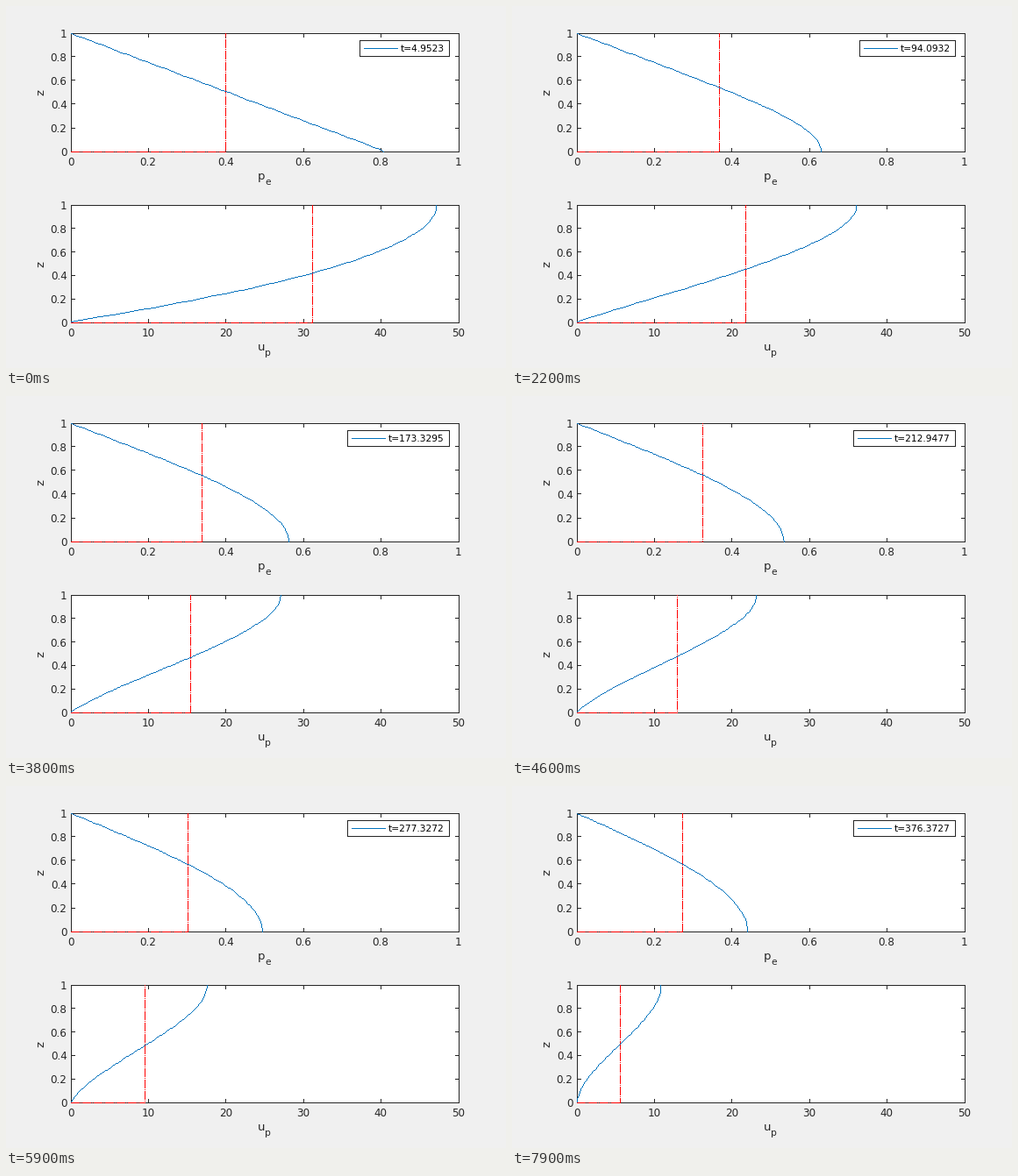
These frames come from a looping animation (570x413 px, 8000 ms). A matplotlib script:

```python
import math
import numpy as np
import matplotlib.pyplot as plt
from matplotlib.animation import FuncAnimation
from matplotlib.collections import PolyCollection
from matplotlib.patches import Rectangle

W, H, DPI = 570, 413, 100
PX = 72 / DPI                      # one pixel in points
X0, X1 = 74, 516
SPAN = X1 - X0
UPPER, LOWER = (31, 166), (227, 361)
DARK, BLUE, RED = "#262626", "#0072bd", "#ff0000"
DASH = (10, 2, 1, 2)
DT = 4.952272

plt.rcParams["font.family"] = "DejaVu Sans"
fig = plt.figure(figsize=(W / DPI, H / DPI), dpi=DPI, facecolor="#f0f0f0")
ax = fig.add_axes([0, 0, 1, 1])
ax.set_xlim(0, W)
ax.set_ylim(H, 0)
ax.axis("off")


def stroke(xs, ys, color, z=2, **kw):
    """Hard-edged one pixel line through pixel centres."""
    line, = ax.plot(np.add(xs, 0.5), np.add(ys, 0.5), color=color, lw=PX,
                    antialiased=False, snap=False, zorder=z, **kw)
    return line


def label(x, y, s, size, color=DARK, ha="center", va="baseline", **kw):
    return ax.text(x, y, s, fontsize=size * PX, color=color,
                   ha=ha, va=va, zorder=8, **kw)


def panel(box, xticks, name, sub):
    top, bottom = box
    ax.add_patch(Rectangle((X0, top), SPAN, bottom - top, fc="white", ec="none"))
    stroke([X0, X1, X1, X0, X0], [top, top, bottom, bottom, top], DARK,
           solid_joinstyle="miter", solid_capstyle="projecting")
    last = len(xticks) - 1
    for i, text in enumerate(xticks):
        x = X0 + SPAN * i / last
        label(x - 0.4, bottom + 16, text, 12)
        if 0 < i < last:
            stroke([int(x)] * 2, [bottom - 4, bottom], DARK)
            stroke([int(x)] * 2, [top, top + 4], DARK)
    for i, text in enumerate(("0", "0.2", "0.4", "0.6", "0.8", "1")):
        y = round(bottom - (bottom - top) * i / 5)
        label(69.5, y + 5, text, 12, ha="right")
        if 0 < i < 5:
            y = int(bottom + 0.1 - (bottom - top + 0.5) * i / 5)
            stroke([X0, X0 + 4], [y, y], DARK)
            stroke([X1 - 4, X1], [y, y], DARK)
    label(291, bottom + 32, name, 13.2)
    label(298.4, bottom + 38, sub, 10.6)
    label(40, (top + bottom) / 2 + 0.5, "z", 13.2, va="center", rotation=90)


panel(UPPER, ("0", "0.2", "0.4", "0.6", "0.8", "1"), "p", "e")
panel(LOWER, ("0", "10", "20", "30", "40", "50"), "u", "p")

# Key values over time, joined by smooth cubics
KNOTS = DT * np.array([1, 10, 28, 43, 56, 65, 76])
P_MEAN = np.array([250, 243, 228.3, 217.3, 207.3, 201.3, 194])
U_MEAN = np.array([349, 305, 233, 188, 158, 141, 123])
U_TOP = np.array([47.1, 41.6, 30.7, 23.1, 17.5, 14.2, 10.8])


def smooth(t, vals):
    i = int(np.clip(np.searchsorted(KNOTS, t) - 1, 0, len(KNOTS) - 2))
    m = np.gradient(vals, KNOTS)
    h = KNOTS[i + 1] - KNOTS[i]
    s = (t - KNOTS[i]) / h
    return ((1 + 2 * s) * (1 - s) ** 2 * vals[i] + s * (1 - s) ** 2 * h * m[i]
            + s * s * (3 - 2 * s) * vals[i + 1] + s * s * (s - 1) * h * m[i + 1])


erfc = np.vectorize(math.erfc)


def ierfc(x):
    return np.exp(-x * x) / math.sqrt(math.pi) - x * erfc(x)


Z = np.linspace(0, 1, 51)


def pressure(t):
    """Linear profile relaxing from a sealed bottom, drained top."""
    s = t - DT
    tau = 0.000444 * s + 0.0008 * (1 - math.exp(-s / 5)) + 0.00006
    d = 2 * math.sqrt(tau)
    return 0.813 * (1 - Z - d * (ierfc(Z / d) - ierfc((2 - Z) / d)))


def displacement(t):
    """Parabola turning into an S-curve as its mean falls."""
    top = smooth(t, U_TOP)
    mean = (smooth(t, U_MEAN) - X0) * 50 / SPAN
    w = 6.2 * (mean / top - 0.5)
    return top * (w * (2 * Z - Z * Z) + (1 - w) * (3 * Z**2 - 2 * Z**3))


SQUARE = np.array([(0, 0), (1, 0), (1, 1), (0, 1)])


class Curve:
    """Polyline drawn as a chain of single pixels."""

    def __init__(self, box, limit, start=0):
        top, bottom = box
        self.scale = SPAN / limit
        self.ys = bottom - (bottom - top) * (start + (1 - start) * Z)
        self.dots = PolyCollection([], facecolors=BLUE, edgecolors="none",
                                   antialiaseds=False, snap=False, zorder=4)
        ax.add_collection(self.dots, autolim=False)

    def move(self, vals):
        pts = np.rint(np.column_stack([X0 + self.scale * vals, self.ys]))
        chain = [pts[:1]]
        for a, b in zip(pts, pts[1:]):
            n = int(np.abs(b - a).max())
            if n:
                steps = np.arange(1, n + 1)[:, None] / n
                chain.append(np.rint(a + (b - a) * steps))
        cells = np.concatenate(chain)
        self.dots.set_verts(cells[:, None, :] + SQUARE)


class Mean:
    """Dash-dot path along the bottom axis, then up at the mean."""

    def __init__(self, box):
        self.top, self.bottom = box
        self.flat = stroke([], [], RED, 3, ls=(0, DASH))
        self.rise = stroke([], [], RED, 3)

    def move(self, x):
        c = int(round(x))
        self.flat.set_data([X0, c], [self.bottom + 0.5] * 2)
        self.rise.set_data([c + 0.5] * 2, [self.bottom + 1, self.top])
        self.rise.set_linestyle(((c - X0) % sum(DASH), DASH))


p_mean, u_mean = Mean(UPPER), Mean(LOWER)
p_curve = Curve(UPPER, 1)
u_curve = Curve(LOWER, 50, start=0.01)

key_box = Rectangle((403.5, 39.5), 102, 18, fc="white", ec=DARK, lw=PX,
                    antialiased=False, snap=False, zorder=6)
ax.add_patch(key_box)
key_line = stroke([408, 446], [48, 48], BLUE, 7)
key_text = label(450, 52, "", 10.6, "black", ha="left")


def update(i):
    t = DT * (1 if i < 5 else i - 3)
    p_curve.move(pressure(t))
    u_curve.move(displacement(t))
    p_mean.move(smooth(t, P_MEAN))
    u_mean.move(smooth(t, U_MEAN))

    text = "t=" + f"{t:.4f}".rstrip("0")
    left = 403 - 7 * (len(text) - 8)
    key_box.set_x(left + 0.5)
    key_box.set_width(505 - left)
    key_line.set_xdata([left + 5.5, left + 43.5])
    key_text.set_text(text)
    key_text.set_x(left + 47)
    return ()


anim = FuncAnimation(fig, update, frames=80, interval=100,
                     init_func=lambda: update(0), repeat=True, repeat_delay=0)
plt.show()
```
